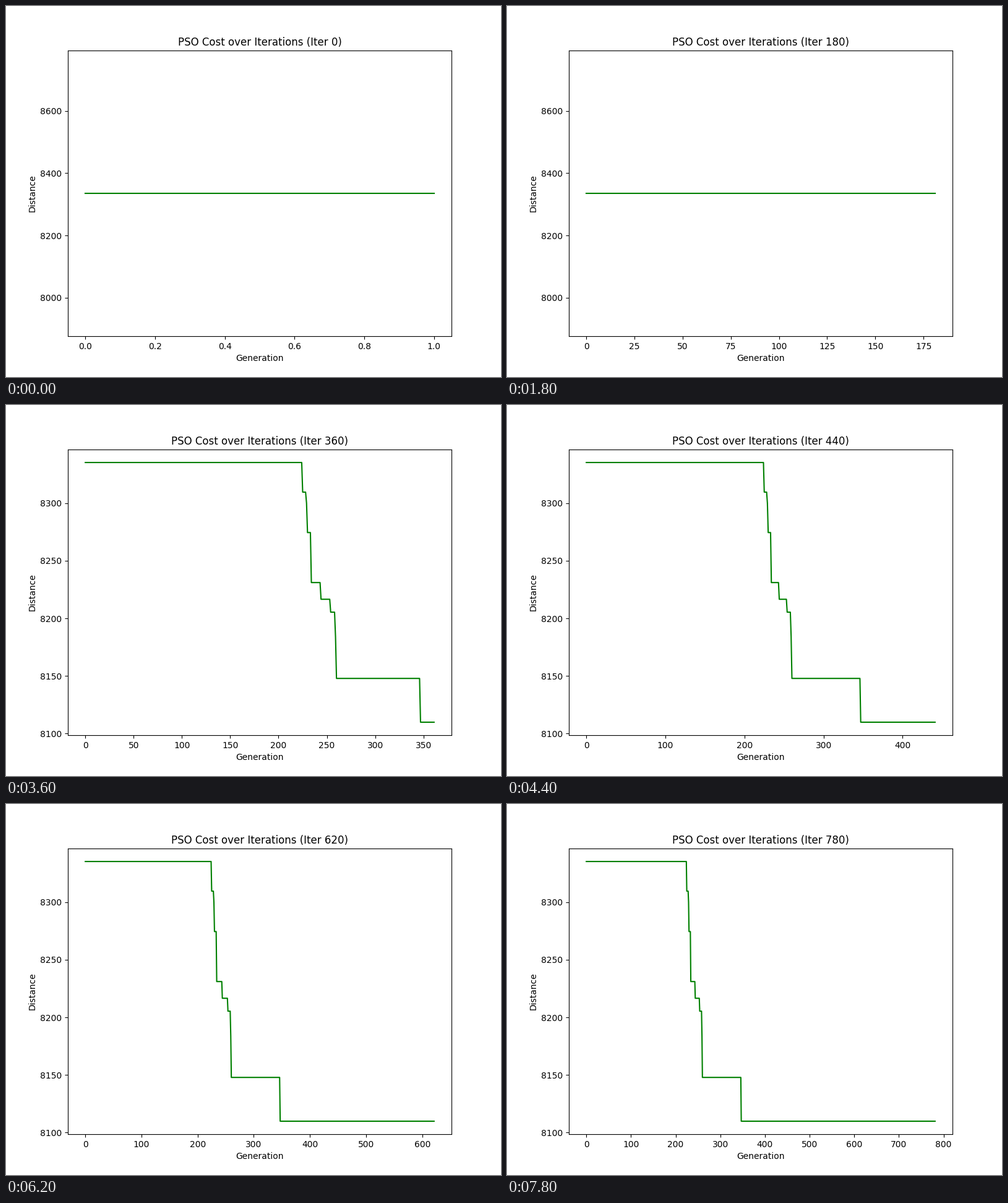
A matplotlib script that plays this animation: 800 px wide and 600 px high, repeating every 8000 ms.

```python
import numpy as np
import matplotlib.pyplot as plt
from matplotlib.animation import FuncAnimation

FRAMES = 40
INTERVAL = 200
ITERS_PER_FRAME = 20
START_COST = 8335.3

# generation: improvement of the best distance found there
GAINS = {225: 25.7, 229: 9.6, 230: 25.5, 234: 43.4, 244: 14.5,
         254: 11.2, 259: 21.4, 260: 36.1, 347: 38.0}

gain = np.zeros(FRAMES * ITERS_PER_FRAME + 2)
gain[list(GAINS)] = list(GAINS.values())
costs = START_COST - np.cumsum(gain)

fig, ax = plt.subplots(figsize=(8, 6), dpi=100)


def draw(frame):
    iteration = frame * ITERS_PER_FRAME
    ax.clear()
    ax.plot(costs[:iteration + 2], color="green")
    ax.set_title(f"PSO Cost over Iterations (Iter {iteration})")
    ax.set_xlabel("Generation")
    ax.set_ylabel("Distance")


anim = FuncAnimation(fig, draw, frames=FRAMES, init_func=lambda: draw(0),
                     interval=INTERVAL, repeat=True, repeat_delay=0)
plt.show()
```
